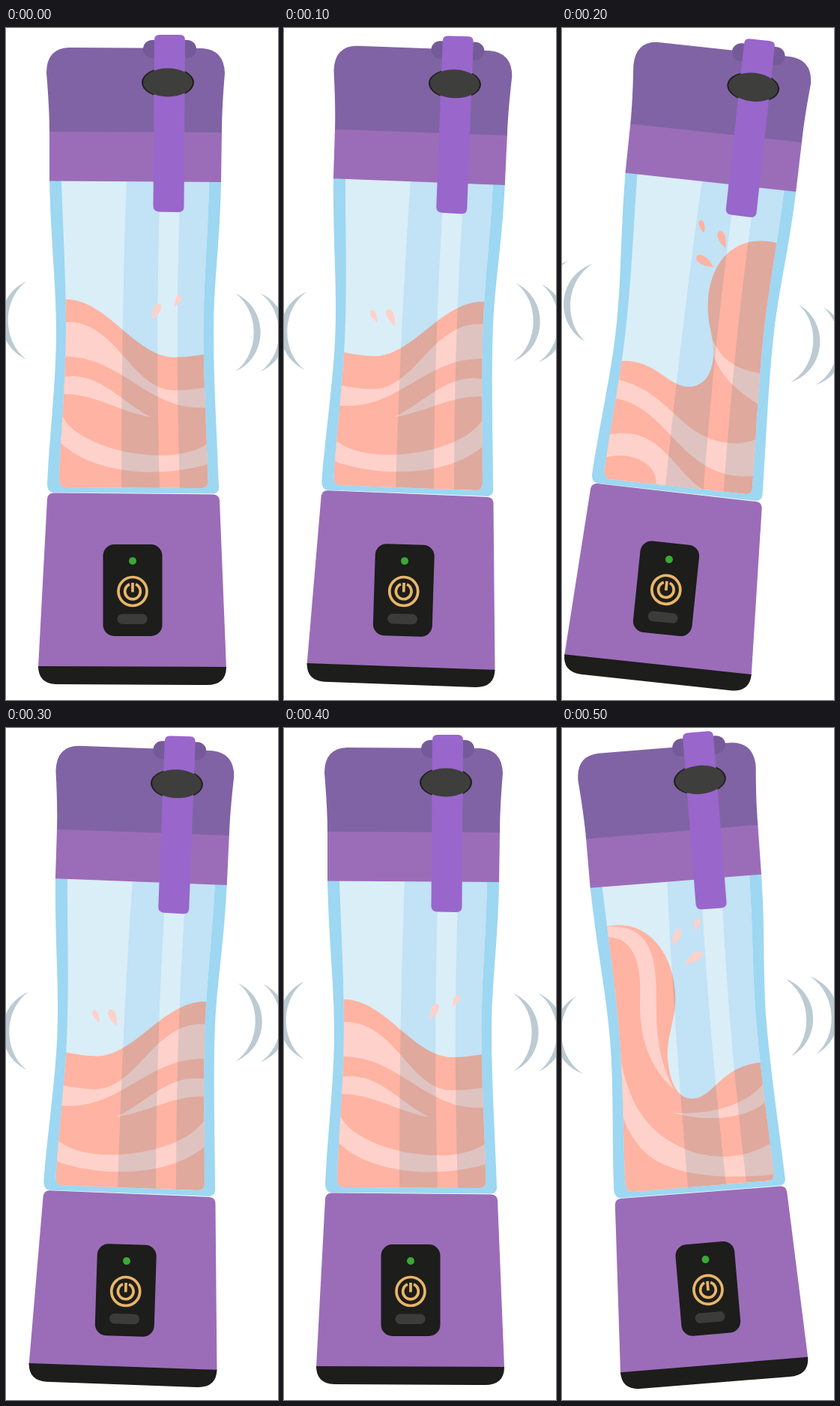
Animation of 363x894 px, one loop 600 ms. Source, as an HTML page:

```html
<!DOCTYPE html>
<html lang="en">
<head>
<meta charset="utf-8">
<title>Shaking blender</title>
<style>
  html, body { margin: 0; width: 100%; height: 100%; overflow: hidden; background: #fff; }
  svg { display: block; width: 100%; height: 100%; }
</style>
</head>
<body>
<svg viewBox="0 0 363 894">
  <defs>
    <path id="inner" d="M74 203C76 270 80 330 80 400C80 470 74 520 71 600Q71 611 80 611L262 612Q270 611 269.500 602C267 520 263.500 470 263.500 400C264 330 270 270 271 204Z"/>
    <path id="bands" d="M161 203Q154 380 154 612L205 612Q199 400 206 204ZM233 204Q225 400 232 612H290V204Z"/>
    <path id="crescent" d="M0 0C45 20 45 84 0 104C33 80 33 24 0 0Z"/>
    <clipPath id="glass"><use href="#inner"/></clipPath>
    <clipPath id="wave"><path class="body"/></clipPath>
  </defs>

  <g id="bottle">
    <g id="marks" fill="#bccad2"></g>

    <path fill="#9dd7f2" d="M58 202C60 290 67 340 67 405C67 470 58 540 55 606Q55 618 64 618L276 619.500Q285 619 284 609C281 530 277 470 277 400C277 340 286 280 287 203Z"/>
    <use href="#inner" fill="#daeef8"/>
    <g clip-path="url(#glass)">
      <use href="#bands" fill="#c2e2f5"/>
      <path class="body" fill="#ffb3a2"/>
      <g clip-path="url(#wave)">
        <path id="pale" fill="#ffd1cb"/>
        <use href="#bands" fill="#2d737d" fill-opacity=".15"/>
      </g>
      <path id="drops"/>
    </g>

    <path fill="#9b6db8" d="M63 618.500L277 620.500Q284 621 285 628L294 851H43L55 626Q56 619 63 618.500Z"/>
    <path fill="#1d1d1b" d="M43 849L294 850Q294 874 268 874L67 873Q43 872 43 849Z"/>
    <rect x="129.500" y="687" width="79" height="122" rx="15" fill="#1d1d1b"/>
    <circle cx="169" cy="709" r="5" fill="#3aaa35"/>
    <g fill="none" stroke="#e9b667" stroke-width="3.700">
      <circle cx="169" cy="749.500" r="19"/>
      <path d="M165 740A10.300 10.300 0 1 0 173 740M169 738V750.500"/>
    </g>
    <rect x="148.500" y="779.500" width="40" height="13.500" rx="6.700" fill="#3c3c3b"/>

    <path fill="#9b6db8" d="M58 137L288 138L287 205L58 203.500Z"/>
    <path fill="#8063a5" d="M58 138Q58 108 54 60Q54 27 84 26L262 27Q291 29 292 60Q288 108 288 139Z"/>
    <rect x="183" y="16" width="71" height="24" rx="12" fill="#755a99"/>
    <ellipse cx="216" cy="72.500" rx="35" ry="20" fill="#1d1d1b"/>
    <path fill="#9966cc" d="M205 9H232Q239 9 239 16L237.500 238Q237.500 245 230 245L204 244.500Q196.500 244 196.500 237L198 16Q198 9 205 9Z"/>
    <ellipse cx="216" cy="72.500" rx="33" ry="19" fill="#3e3e3c"/>
  </g>
</svg>
<script>
const STEP = 100, ORDER = [0, 1, 2, 1, 0, 3];
const PEACH = '#ffb3a2', PINK = '#ffd1cb';
const $ = s => document.querySelector(s);

// Teardrop from its round end (x, y) to its tip (tx, ty)
function drop([x, y, tx, ty]) {
  const dx = x - tx, dy = y - ty;
  const ctrl = k => `${tx + 1.33 * dx - k * dy} ${ty + 1.33 * dy + k * dx}`;
  return `M${tx} ${ty}C${ctrl(.7)} ${ctrl(-.7)} ${tx} ${ty}Z`;
}

const slosh = {
  body: 'M60 361H80C135 361 172 437 224 438Q245 438 264 434L290 428V620H60Z',
  pale: `M60 391H79C148 388 167 482 225 482Q247 482 266 478L290 472V502L267 505
    C190 510 155 437 78 437H60Z
    M60 467L77 464C125 457 150 495 194 518C150 510 120 487 77 487H60Z
    M60 495L74 514C95 562 220 586 267 554L285 545V572L267 581C200 600 115 592 73 552L60 540Z`
};

// tilt: degrees around the lamp; at: lamp position; marks: top of left and right marks
const poses = [
  { ...slosh, tilt: 0, at: [169, 709], marks: [337, 353], color: PINK,
    drops: [[205, 367, 195, 388], [233, 355, 225, 371]] },
  { ...slosh, flip: true, tilt: 1.8, at: [161, 709], marks: [355, 335], color: PINK,
    drops: [[207, 375, 197, 397], [229, 377, 220, 393]] },
  { tilt: 5.9, at: [143, 707], marks: [328, 354], color: PEACH,
    body: `M60 453H77C124 447 140 477 167 478C190 478 201 460 200 432
      C198 405 186 395 185 355C186 295 226 260 290 280V620H60Z`,
    pale: `M197 412C210 437 233 449 264 450H290V505L265 491C235 475 212 460 200 432Z
      M60 476L77 478C150 488 165 547 234 547Q252 546 266 539L285 530V585L270 587
      C175 605 150 508 75 503H60Z
      M60 556L72 552C140 532 160 590 206 613H141C143 582 100 570 70 583L60 588Z`,
    drops: [[164, 256, 171, 272.5], [191, 267.5, 201, 289.5], [164, 304, 188, 316]] },
  { tilt: -4.9, at: [191.5, 707], marks: [345, 345.5], color: PINK,
    body: `M60 260L76 256.500C130 249 161 300 159 352C159 385 141 410 141.500 440
      C142 475 152 494 171 494.500C200 494 210 455 266 454H290V620H60Z`,
    pale: `M60 259L76 257C155 258 132 340 131 398Q130 440 146 480
      C110 440 109 400 110.500 366C116 325 118 276 76 270.500H60Z
      M60 400L79 430C85 520 130 552 174 569Q225 584 268 563L290 552V604H268
      C190 606 115 590 91 547Q77 525 75 505L60 480Z
      M142 511C190 518 240 510 266 482.500L285 465V495L265 508.500C235 528 185 527 142 511Z`,
    drops: [[172, 268, 161.5, 289], [199, 256, 191, 272], [199, 302, 175, 315]] }
];

function show(p) {
  const flip = p.flip ? 'translate(343) scale(-1 1)' : '';
  const put = (el, d) => { el.setAttribute('d', d); el.setAttribute('transform', flip); };
  document.querySelectorAll('.body').forEach(el => put(el, p.body));
  put($('#pale'), p.pale);
  put($('#drops'), p.drops.map(drop).join(''));
  $('#drops').setAttribute('fill', p.color);

  const mark = (x, y, side) =>
    `<use href="#crescent" transform="translate(${x} ${y}) scale(${side} 1)"/>`;
  const [left, right] = p.marks;
  $('#marks').innerHTML = mark(27.5, left, -1) + mark(-6, left, -1)
    + mark(306, right, 1) + mark(339.5, right, 1);
  $('#bottle').setAttribute('transform',
    `translate(${p.at}) rotate(${p.tilt}) translate(-169 -709)`);
}

let shown;
function tick() {
  const pose = poses[ORDER[Math.floor(performance.now() / STEP) % ORDER.length]];
  if (pose !== shown) show(shown = pose);
  requestAnimationFrame(tick);
}
tick();
</script>
</body>
</html>
```
